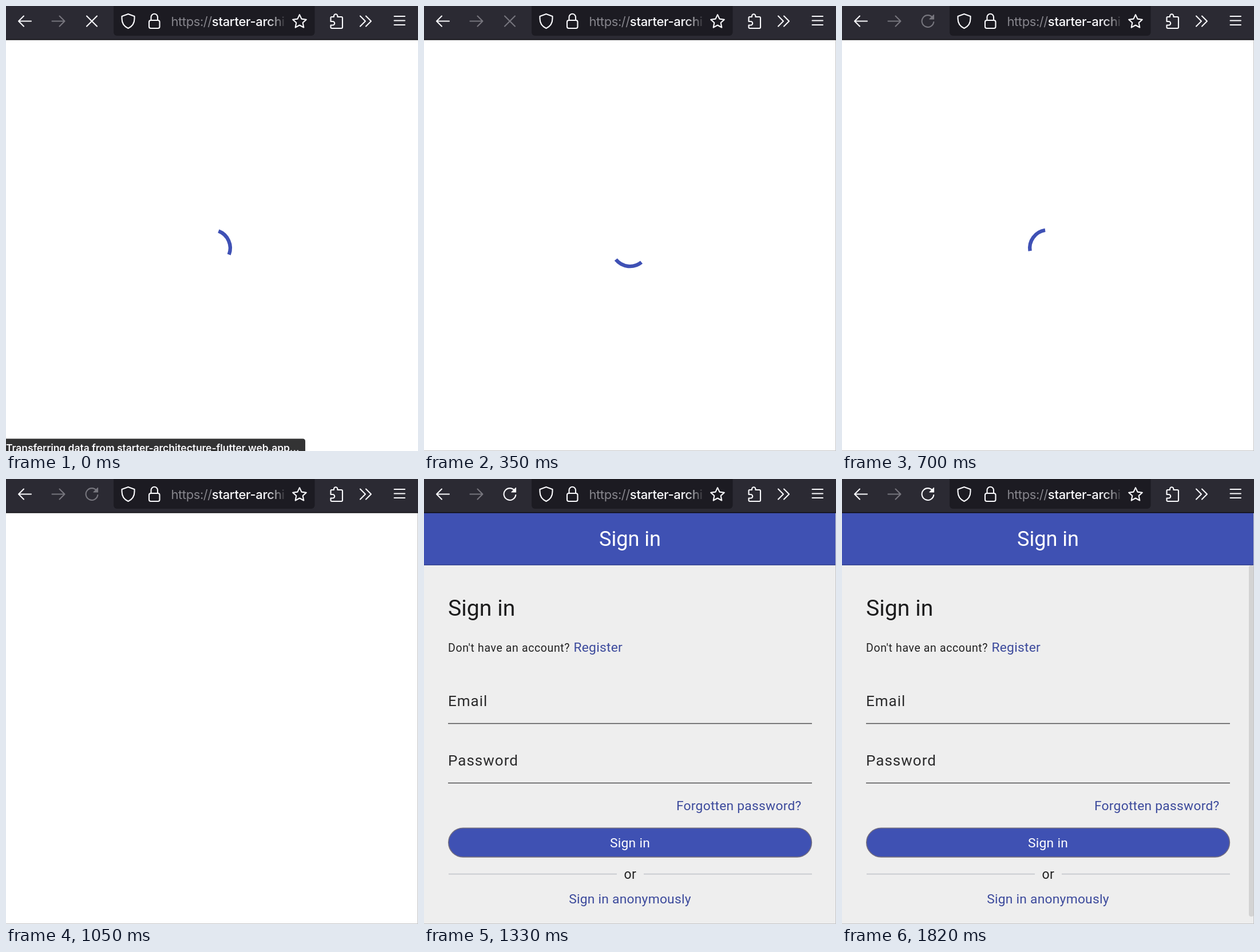
An HTML page that plays this animation: 720 px wide and 778 px high, repeating every 1.89 s.

```html
<!DOCTYPE html>
<html lang="en">
<head>
<meta charset="utf-8">
<title>Loading to sign in</title>
<style>
  html, body { margin: 0; width: 100%; height: 100%; overflow: hidden; background: #fff; }
  svg { display: block; width: 720px; height: 778px; }
  text { font-family: Roboto, sans-serif; white-space: pre; }
  .ui text { font-family: Inter, sans-serif; }
  .icon { fill: none; stroke: #fbfbfe; stroke-width: 2.1; stroke-linecap: round; stroke-linejoin: round; }
  .dim { stroke: #77767e; }
  .link { fill: #3c4a9c; font-size: 22.8px; letter-spacing: .24px; }
  .field { fill: #2b2b2c; font-size: 26.1px; letter-spacing: .95px; }
  .mid { text-anchor: middle; }
</style>
</head>
<body>
<svg viewBox="0 0 720 778">
  <defs>
    <linearGradient id="fade">
      <stop offset="0" stop-color="#1c1b22" stop-opacity="0"/>
      <stop offset="1" stop-color="#1c1b22"/>
    </linearGradient>
  </defs>
  <rect width="720" height="778" fill="#fff"/>

  <path id="spinner" d="M337.5 400.8A31.8 31.8 0 0 1 382.5 400.8" fill="none" stroke="#3f51b5" stroke-width="6.4"/>

  <g id="page">
    <rect y="59" width="720" height="719" fill="#eee"/>
    <rect y="59" width="720" height="91.5" fill="#3f51b3"/>
    <rect y="149.5" width="720" height="1.3" fill="#303d8c"/>
    <text class="mid" x="360" y="117" font-size="36.1" fill="#fff">Sign in</text>
    <text x="42" y="239" font-size="39.2" fill="#1c1c1d">Sign in</text>
    <text x="42" y="302" font-size="19.5" letter-spacing=".62" fill="#222">Don't have an account?</text>
    <text class="link" x="261.5" y="302">Register</text>
    <text class="field" x="42" y="397">Email</text>
    <text class="field" x="42" y="501">Password</text>
    <path d="M42 427.5H678M42 531.5H678" stroke="#4c4c4e" stroke-width="1.3"/>
    <text class="link" x="441" y="579">Forgotten password?</text>
    <rect x="42.8" y="610.3" width="634.6" height="50.6" rx="25.3" fill="#3f51b3" stroke="#716d80" stroke-width="1.6"/>
    <text class="mid" x="360" y="644" font-size="22.8" letter-spacing=".28" fill="#fff">Sign in</text>
    <path d="M43 690.7H337M384 690.7H678" stroke="#c5c8cd" stroke-width="1.8"/>
    <text class="mid" x="360.4" y="699" font-size="23" letter-spacing=".4" fill="#222">or</text>
    <text class="link mid" x="360" y="742">Sign in anonymously</text>
    <rect id="scrollbar" x="711" y="151" width="8.5" height="614" rx="4" fill="#d3d3d3"/>
  </g>

  <path id="edge" d="M719.5 59V778M0 777.5H720" stroke="#c4c4c6" fill="none"/>

  <g class="ui">
    <g id="status">
      <path d="M0 756.5H518.5Q523 756.5 523 761V778H0Z" fill="#333334"/>
      <text x="0" y="778.5" font-size="17.5" font-weight="600" letter-spacing="-.05" fill="#fbfbfe">Transferring data from starter-architecture-flutter.web.app...</text>
    </g>
    <rect width="720" height="58" fill="#2b2a33"/>
    <rect y="58" width="720" height="1.6" fill="#0f0e13"/>
    <rect x="188" y="-8" width="351.5" height="60" rx="6" fill="#1c1b22"/>
    <text x="288.5" y="35" font-size="22" letter-spacing="-.42" fill="#86858c">https://<tspan fill="#fbfbfe" font-weight="500" letter-spacing="-.3">starter-archi</tspan></text>
    <rect x="456" y="8" width="34" height="38" fill="url(#fade)"/>
    <rect x="489" y="8" width="11" height="38" fill="#1c1b22"/>

    <g class="icon">
      <path d="M44 26.5H22M31 17.5L22 26.5L31 35.5"/>
      <path class="dim" d="M80.5 26.5H102.5M93.5 17.5L102.5 26.5L93.5 35.5"/>
      <path id="stop" d="M141 17.5L159 35.5M159 17.5L141 35.5"/>
      <g id="reload">
        <path d="M158.3 20.2A10.4 10.4 0 1 0 160.3 28"/>
        <path d="M160.5 15.5V23H153Z" fill="currentColor" stroke-width="1.2"/>
      </g>
      <path d="M213.5 14L224.5 18V22Q224.5 34 213.5 39Q202.5 34 202.5 22V18Z"/>
      <rect x="250" y="25" width="18.5" height="14" rx="3"/>
      <path d="M253.5 25V19.5A5.7 5.7 0 0 1 265 19.5V25"/>
      <path id="star"/>
      <path d="M567.5 22.5V20.5Q567.5 19 569 19H573V17.5A3.2 3.2 0 0 1 579.4 17.5V19H586Q588 19 588 21V37Q588 39 586 39H569.5Q567.5 39 567.5 37V33.5H571A3 3 0 0 0 571 27H567.5Z"/>
      <path d="M619 17.5L628 26.5L619 35.5M629 17.5L638 26.5L629 35.5"/>
      <path d="M678.5 18H697M678.5 25.5H697M678.5 33H697" stroke-width="2"/>
    </g>
  </g>
</svg>
<script>
  const LOOP = 1890, STEP = 70;
  const byId = id => document.getElementById(id);

  // When each part is visible, in ms.
  const spans = {
    status: [0, 350],
    edge: [70, LOOP],
    spinner: [0, 1050],
    stop: [0, 490],
    reload: [490, LOOP],
    page: [1120, LOOP],
  };

  const starPoints = Array.from({ length: 10 }, (_, i) => {
    const angle = (i / 5 - 0.5) * Math.PI, r = i % 2 ? 6 : 12.4;
    return `${513 + r * Math.cos(angle)} ${27.5 + r * Math.sin(angle)}`;
  });
  byId('star').setAttribute('d', `M${starPoints.join('L')}Z`);

  function tint(id, active) {
    const color = active ? '#fbfbfe' : '#77767e';
    byId(id).style.stroke = byId(id).style.color = color;
  }

  function render(time) {
    const t = Math.floor((time % LOOP) / STEP) * STEP;
    for (const [id, [from, to]] of Object.entries(spans)) {
      byId(id).style.display = t >= from && t < to ? '' : 'none';
    }
    const turn = 66 + t / STEP * 24;
    byId('spinner').setAttribute('transform', `rotate(${turn} 360 423.3)`);
    tint('stop', t < 350);
    tint('reload', t >= 1120);
    byId('scrollbar').style.opacity = Math.min(1, Math.max(0, (t - 1330) / 350));
  }

  const start = performance.now();
  function tick() {
    render(performance.now() - start);
    requestAnimationFrame(tick);
  }
  tick();
</script>
</body>
</html>
```
